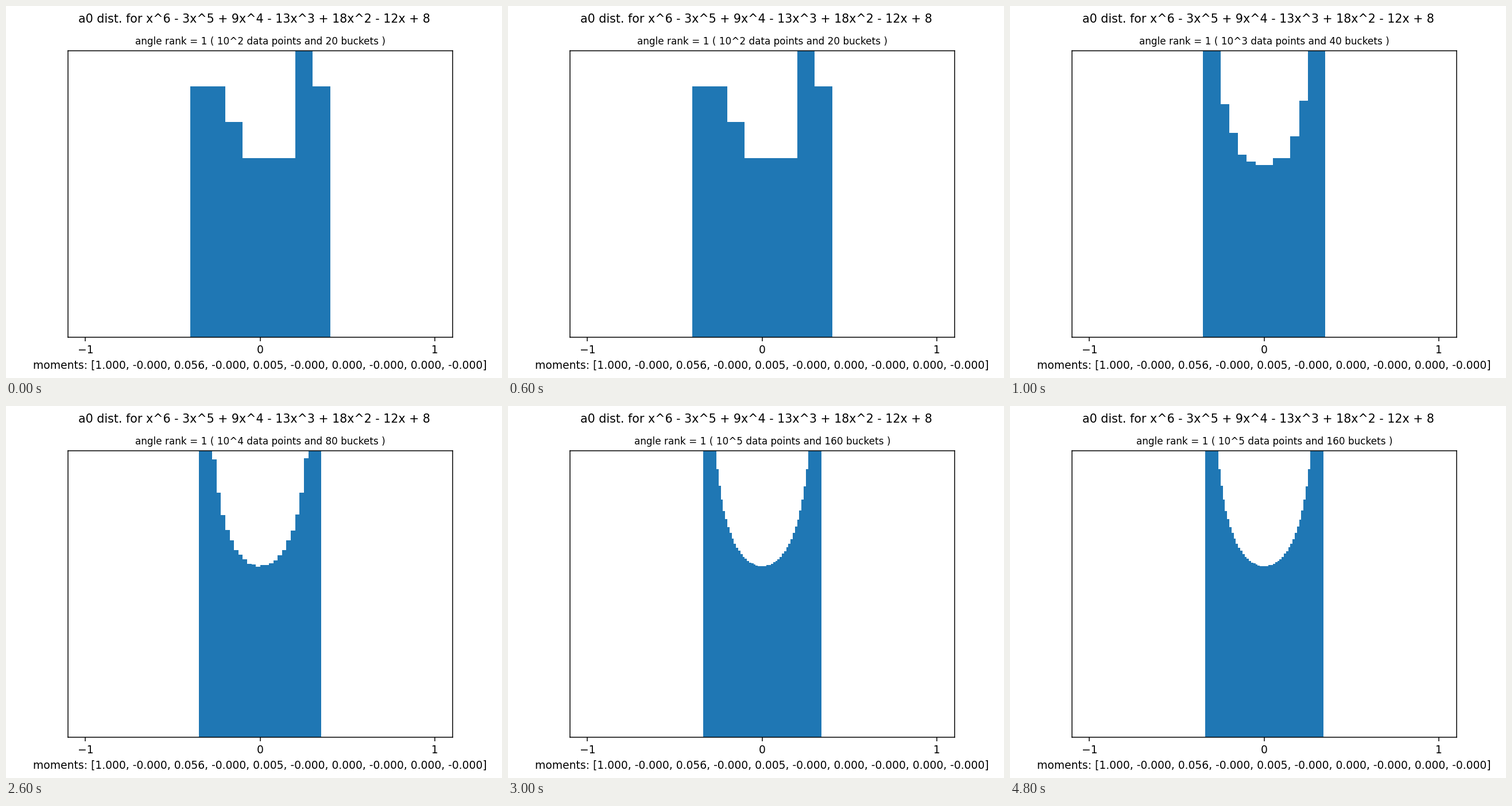
A matplotlib script for the animation above (6000 ms loop, 864 by 648 pixels).

```python
import numpy as np
import matplotlib.pyplot as plt
from matplotlib.animation import FuncAnimation

plt.rcParams["font.family"] = "DejaVu Sans"

# Angle of the roots of x^2 - x + 2, whose cube is the polynomial in the heading.
THETA = np.arccos(1 / np.sqrt(8))
STAGES = [(2, 20), (3, 40), (4, 80), (5, 160)]  # (power of ten, buckets)
FRAMES, INTERVAL = 6, 1000

fig, ax = plt.subplots(figsize=(6.4, 4.8), dpi=135)
fig.suptitle("a0 dist. for x^6 - 3x^5 + 9x^4 - 13x^3 + 18x^2 - 12x + 8",
             fontsize=11)
title = ax.set_title("", fontsize=9)


def draw_histogram(power, buckets):
    n = np.arange(1, 10**power + 1)
    values = np.cos(n * THETA) / 3
    _, _, bars = ax.hist(values, bins=buckets, range=(-1, 1),
                         density=True, color="#1f77b4")
    return bars


histograms = [draw_histogram(*stage) for stage in STAGES]

ax.set_xlim(-1.1, 1.1)
ax.set_ylim(0, 1.6)
ax.set_xticks([-1, 0, 1], ["\u22121", "0", "1"])
ax.set_yticks([])
ax.set_xlabel("moments: [1.000, -0.000, 0.056, -0.000, 0.005, "
              "-0.000, 0.000, -0.000, 0.000, -0.000]")


def update(frame):
    current = min(frame, len(STAGES) - 1)
    for i, bars in enumerate(histograms):
        for bar in bars:
            bar.set_visible(i == current)
    power, buckets = STAGES[current]
    title.set_text(f"angle rank = 1 ( 10^{power} data points "
                   f"and {buckets} buckets )")
    return [title]


anim = FuncAnimation(fig, update, frames=FRAMES, interval=INTERVAL,
                     repeat=True, repeat_delay=0, blit=False)
plt.show()
```
